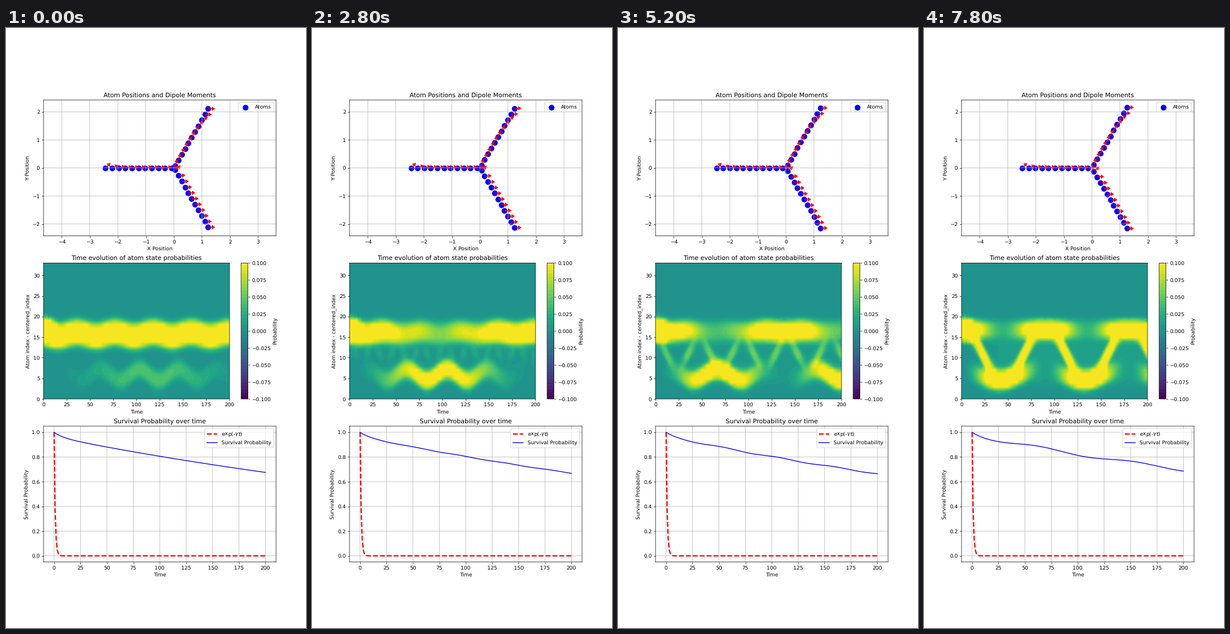
These frames come from a looping animation (529 px wide and 1058 px high, 8000 ms). A matplotlib script:

```python
import numpy as np
import matplotlib.pyplot as plt
from matplotlib.animation import FuncAnimation

FRAMES, INTERVAL = 40, 200
ARM = 11                      # atoms per arm of the Y
STEP = 0.2357                 # distance between neighbours
PEAK = 0.16                   # height of the full packet

plt.rcParams.update({"font.family": "DejaVu Sans", "text.hinting": "none",
                     "path.snap": False})

time = np.linspace(0, 200, 201)
T, N = np.meshgrid(time, np.arange(34))
LEVELS = np.linspace(-0.1, 0.1, 41)


def wave(t, period, peak=0.0):
    """Cosine with a crest at the given time."""
    return np.cos(2 * np.pi * (t - peak) / period)


def swap(t, period):
    """Share handed over in a two-level oscillation, 0 to 1 and back."""
    return (1 - wave(t, period)) / 2


def band(centre, width):
    return np.exp(-np.abs((N - centre) / width) ** 3)


def hop_time(s):
    """Time between two crossings of the junction."""
    return 45 * np.exp(-1.95 * (1 - s))


def bounce_time(s):
    """Round trip of the packet within the lower arm."""
    return (42 ** 4 + (2 * hop_time(s)) ** 4) ** 0.25


def probabilities(s):
    """Packet shared by two arms, coupled more strongly as s goes 0 to 1."""
    moved = swap(T, 1 / (0.0043 + 0.0068 * s ** 2))
    opening = 1 - np.exp(-3 * s)
    beat = wave(T, 41, 36)

    upper = PEAK * (1 - 0.9 * opening * moved) * (1 + 0.25 * (1 - s) * opening * beat)
    upper *= band(15.7 + 1.1 * s + 0.45 * (1 - s) * beat, 2.9 - 0.7 * s)

    lower = (0.045 + 0.115 * opening) * moved
    lower *= band(5.9 - 1.3 * wave(T, bounce_time(s), 40), 2.3)

    hop = hop_time(s)
    bridge = 0.11 * s ** 2 * swap(T, hop)
    bridge *= band(11 + 6 * s ** 2 * wave(T, 2 * hop), 1.2 + s ** 2)

    ragged = 2.5 + 0.3 * np.cos(1.7 * T) * np.exp(-T / 10)
    start = PEAK * np.exp(-(T / 13) ** 4) * band(16.9 - T / 25, ragged)

    haze = 0.012 * s * np.exp(-((N - 11) / 8) ** 6) * (1 - np.exp(-(T / 30) ** 2))
    return upper + lower + bridge + start + haze


def survival(s):
    """Quick first loss, then slow decay that pauses on each bounce."""
    rate = 0.00177 - 0.00009 * s + 0.0012 * s ** 2 * (1 - s)
    decay = 0.962 * np.exp(-rate * time) + 0.038 * np.exp(-time / 8.8)
    period = bounce_time(s)
    ripple = 0.001 * s * period / (2 * np.pi) * wave(time, period, 40 + period / 4)
    return decay * (1 + (ripple + 0.012 * s) * (1 - np.exp(-time / 20)))


def atoms(s):
    """Positions on three arms that slowly slide outwards."""
    r = 0.083 + 0.052 * s + STEP * np.arange(ARM)
    return np.concatenate([np.column_stack([r * np.cos(a), r * np.sin(a)])
                           for a in np.radians([180, 60, -60])])


def dipole_angles():
    k = np.arange(ARM)
    left = 10 + 35 * 0.35 ** (ARM - 1 - k)
    up = 70 * (1 - np.minimum(k / 9, 1) ** 4)
    down = 38 * 0.1 ** k
    return np.radians(np.concatenate([left, up, down]))


fig, (ax_pos, ax_map, ax_decay) = plt.subplots(3, 1, figsize=(8, 16), dpi=66.125)

xy, angle = atoms(0), dipole_angles()
dots = ax_pos.scatter(*xy.T, s=100, color="blue", label="Atoms")
arrows = ax_pos.quiver(*xy.T, 0.255 * np.cos(angle), 0.255 * np.sin(angle),
                       color="red", units="xy", scale_units="xy", scale=1,
                       width=0.028, headwidth=5.6, headlength=4.4,
                       headaxislength=4.4)
ax_pos.set(title="Atom Positions and Dipole Moments", xlabel="X Position",
           ylabel="Y Position", xlim=(-4.652, 3.643), ylim=(-2.4236, 2.4236))
ax_pos.grid(True)
ax_pos.legend(loc="upper right")


def draw_map(s):
    field = np.clip(probabilities(s), 0.0005, 0.0999)
    return ax_map.contourf(T, N, field, levels=LEVELS, cmap="viridis")


current = [draw_map(0)]
fig.colorbar(current[0], ax=ax_map, label="Probability",
             ticks=np.linspace(-0.1, 0.1, 9))
ax_map.set(title="Time evolution of atom state probabilities", xlabel="Time",
           ylabel="Atom index - centered_index", xlim=(0, 200), ylim=(0, 33))

ax_decay.plot(time, np.exp(-time), "r--", lw=2.5, label=r"exp(-$\gamma t$)")
line, = ax_decay.plot(time, survival(0), "b", lw=1.5, label="Survival Probability")
ax_decay.set(title="Survival Probability over time", xlabel="Time",
             ylabel="Survival Probability", xlim=(-10, 210), ylim=(-0.05, 1.05))
ax_decay.grid(True)
ax_decay.legend(loc="upper right")


def update(frame):
    s = frame / (FRAMES - 1)
    pos = atoms(s)
    dots.set_offsets(pos)
    arrows.set_offsets(pos)
    current[0].remove()
    current[0] = draw_map(s)
    line.set_ydata(survival(s))
    return []


anim = FuncAnimation(fig, update, frames=FRAMES, interval=INTERVAL,
                     init_func=lambda: [], repeat=True, repeat_delay=0)
plt.show()
```
